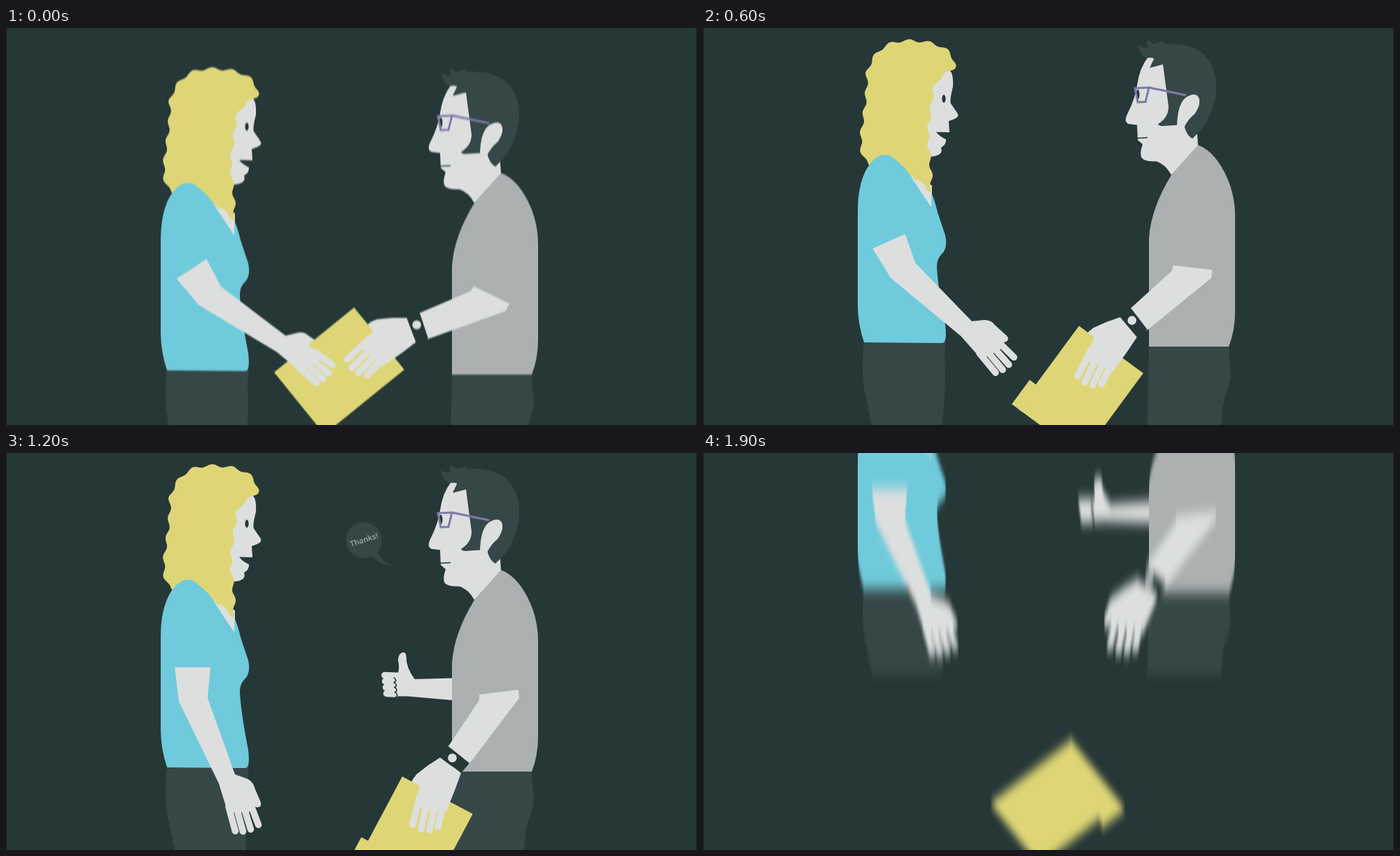
These frames come from a looping animation (987x567 px, 2 s). An HTML page:

```html
<!DOCTYPE html>
<html lang="en">
<head>
<meta charset="utf-8">
<title>Handing over a folder</title>
<style>
  html, body { margin: 0; width: 100%; height: 100%; overflow: hidden; background: #263737; }
  svg { display: block; width: 987px; height: 567px; }
  .skin { fill: #dddfdf; }
  .fingers { fill: none; stroke: #dddfdf; stroke-width: 9.5; stroke-linecap: round; }
  .dark { fill: #263737; }
  .darkLine { fill: none; stroke: #263737; stroke-width: 1.7; }
  .cloth { fill: #364748; }
  .yellow { fill: #ded676; }
  .bubbleText { font: 600 17px "Open Sans", "Noto Sans", sans-serif; fill: #a3abab; text-anchor: middle; }
</style>
</head>
<body>
<svg viewBox="0 0 987 567">
  <filter id="panBlur" filterUnits="userSpaceOnUse" x="0" y="-400" width="987" height="1600" color-interpolation-filters="sRGB">
    <feGaussianBlur id="panAmount" stdDeviation="0 0"/>
  </filter>
  <filter id="softBlur" filterUnits="userSpaceOnUse" x="400" y="150" width="400" height="400" color-interpolation-filters="sRGB">
    <feGaussianBlur stdDeviation="2.5"/>
  </filter>

  <rect width="987" height="567" fill="#263737"/>
  <path d="M.5 0V567M986.5 0V567" stroke="#142020"/>

  <g id="scene">
    <!-- speech bubble -->
    <g id="bubble">
      <circle class="cloth" cx="490" cy="105" r="39.5"/>
      <path class="cloth" d="M508 138Q522 161 551 160Q527 152 520 128Z"/>
      <text class="bubbleText" transform="translate(492 110) rotate(-18)">Thanks!</text>
    </g>

    <!-- raised thumb, behind the man -->
    <g id="thumbArm">
      <path class="skin" d="M700 322L637 324L583 328Q570 312 569.500 296Q569 290 564.500 290.500Q558 292 558 302Q561 312 559 320L549 321V354L575 353L700 358Z"/>
      <path id="fistFingers" class="fingers"/>
      <path id="knuckles" class="darkLine"/>
    </g>

    <!-- woman -->
    <path class="cloth" d="M230 448H347Q344 465 346 490Q346 530 341 572H242L231 520Q225 485 230 448Z"/>
    <path class="skin" d="M330 66L352 60Q358 65 357 84Q352 103 354 108L363 121Q367 127 359 130L351 133L352 149L333 148.500Q338 155 347 159Q348 166 340 171Q345 184 318 184L300 120Z"/>
    <ellipse class="dark" cx="344" cy="101" rx="2.600" ry="5.700"/>
    <path class="skin" d="M275 190L327 225V257L300 235Z"/>
    <path id="hair" class="yellow" d="M237 195C212 172 235 130 234 64C244 28 268 18 292 18C335 18 356 30 360 52C360 66 330 62 328 98L321 150C322 175 328 205 326 234L300 212"/>
    <path fill="#6fcadb" d="M221 265C221 227 229 204 242 190Q253 178 267 182Q292 200 300 217L326 256L326.500 236Q331 246 335 263L346 296Q350 314 341 323Q334 329 334 342Q336 374 346 424Q349 450 342 450L230 449Q221 422 221 395Z"/>

    <!-- man -->
    <path class="cloth" d="M637 453H752Q750 465 754 490Q754 506 747 522Q741 542 740 572H634.500Z"/>
    <path class="skin" d="M636 41Q623 58 620 82Q617 101 607 121Q600 134 608 137L620 138.500L621 160L628 166Q623 180 627 186Q632 191 648 190.500Q661 195 669 210L707 168L700 60Z"/>
    <path class="darkLine" d="M620 157.500L635 156.500"/>
    <ellipse class="dark" cx="621" cy="95" rx="2.500" ry="7"/>
    <path class="cloth" d="M632 43Q623 37 622 24Q628 29 635 28Q633 21 636 16Q640 22 645 23L657 18Q656 22 660 23Q690 20 711 34Q735 53 733 91Q730 121 711 146L699 158Q690 153 687 138L656 140Q651 140 650 137Q665 128 665 112Q660 75 657 52L638 57L645 42Z"/>
    <path class="skin" d="M677 139Q678 108 690 99Q703 91 708 99Q712 109 702 123Q693 130 687 142Z"/>
    <path fill="none" stroke="#7f7aa8" stroke-width="3" d="M617 86L637 85L632 105.500L621 106ZM637 85L690 96"/>
    <path fill="#acb0b1" d="M637 455V300Q640 257 669 210L707 167Q733 177 750 217Q760 242 760 268V405Q760 432 751 455Z"/>

    <!-- thumbs, folder, then the front hands -->
    <path data-arm="woman" class="skin" d="M318 456L344 465Q353 469 355 478L363.500 498Q366 505 360 506Q354 507 350 498L340 490Z"/>
    <path data-arm="man" class="skin" d="M606 444L586 460Q579 466 578 476Q572 489 573 500Q577 508 582 501L606 470Z"/>
    <g data-arm="man">
      <g id="folder" class="yellow">
        <rect width="114" height="147"/>
        <rect id="leftTab" x="-11" y="104" width="20" height="43"/>
        <rect id="rightTab" x="104" width="22" height="40"/>
      </g>
    </g>
    <g data-arm="woman">
      <path class="skin" d="M241 306H292L288 350L327 459L347 488L355 512L317 514L304 472L247 355Z"/>
      <path id="womanFingers" class="fingers"/>
    </g>
    <g data-arm="man">
      <path class="skin" d="M676 345L732 338L733 350L661 445L631 420L676 353Z"/>
      <path class="dark" d="M632 419L662 443L650 457L620 434Z"/>
      <circle class="skin" cx="637.500" cy="435.500" r="6.300"/>
      <path class="skin" d="M620 435L650 457L642 479L629 512L584 506L591 475L585 460L603 446Z"/>
      <path id="manFingers" class="fingers"/>
    </g>
  </g>
</svg>
<script>
const LOOP = 2000, STEP = 100;
const byId = id => document.getElementById(id);
const set = (el, name, value) => el.setAttribute(name, value);
const setFilter = (el, id) => set(el, "filter", id ? `url(#${id})` : "none");

// Smooth 0 to 1 between two times.
function ease(t, from, to) {
  const u = Math.min(1, Math.max(0, (t - from) / (to - from)));
  return u * u * (3 - 2 * u);
}

// Four fingers fanning out from a row of knuckles, the middle ones longest.
function fan(id, [x, y], [dx, dy], [tipX, tipY], [spreadX, spreadY], bow) {
  let d = "";
  for (let i = 0; i < 4; i++) {
    const reach = bow * Math.sin(i * Math.PI / 3);
    d += `M${x + dx * i} ${y + dy * i}L${tipX + spreadX * i} ${tipY + spreadY * i + reach}`;
  }
  set(byId(id), "d", d);
}

// Turns a plain outline into a curly one.
function curl(path, wavelength, depth, phase) {
  const points = [], length = path.getTotalLength();
  for (let s = 0; s <= length; s += 2) {
    const p = path.getPointAtLength(s), q = path.getPointAtLength(s + 1);
    const wave = depth * Math.cos((s - phase) * 2 * Math.PI / wavelength);
    points.push(`${p.x + (q.y - p.y) * wave} ${p.y - (q.x - p.x) * wave}`);
  }
  set(path, "d", `M${points.join("L")}Z`);
}

fan("womanFingers", [318, 505], [10.5, -1], [327.5, 540], [11, -3], 4);
fan("manFingers", [591, 490], [11.5, 2], [581, 531], [12, 1], 6);
fan("fistFingers", [557, 324.5], [0, 8.6], [540, 324.5], [1.3, 8.6], 0);
set(byId("knuckles"), "d", "M553 327" + "q6 4 1 7".repeat(4));
curl(byId("hair"), 28, 2, 218);

// The stage eases in from below and accelerates out at the top.
function panAt(t) {
  return t < LOOP / 2 ? 40 * Math.exp(-t / 60) : -255 * Math.exp((t - 1900) / 55.5);
}

// The raised thumb swings up and settles like a damped spring.
function thumbAngle(t) {
  const since = t - 800;
  return -66 * Math.exp(-since / 134) * Math.cos(since * Math.PI / 500);
}

// Corner and tilt of the folder, relative to the man's arm.
function folderAt(t, grip, pan) {
  const leaving = t - 1800;
  if (leaving >= 0) {
    return { x: 530 - 0.04 * leaving, y: 502 - 0.92 * leaving - pan, tilt: 49 + 0.03 * leaving };
  }
  const pull = Math.exp(-t / 130);
  return { x: 566 - 17 * pull, y: 462 - 2.5 * grip + 4 * pull, tilt: 28 - 13 * grip + 3 * pull };
}

function draw(t) {
  const pan = panAt(t), scene = byId("scene");
  const blur = pan > 0 ? pan / 44 : Math.pow(-pan, 0.6) / 3;
  set(scene, "transform", `translate(0 ${pan})`);
  set(byId("panAmount"), "stdDeviation", `0 ${blur}`);
  setFilter(scene, blur > 0.3 && "panBlur");

  const grip = 1 - ease(t, 350, 800), reach = 1 - ease(t, 450, 900);
  const pose = { woman: `rotate(${-33 * reach} 262.4 307.5)`, man: `rotate(${33 * grip} 699 324)` };
  document.querySelectorAll("[data-arm]").forEach(el => set(el, "transform", pose[el.dataset.arm]));

  const thumbArm = byId("thumbArm");
  set(thumbArm, "transform", `rotate(${thumbAngle(t)} 690 340)`);
  set(thumbArm, "opacity", t < 800 ? 0 : 1);
  setFilter(thumbArm, t < 1100 && "softBlur");

  const { x, y, tilt } = folderAt(t, grip, pan);
  set(byId("folder"), "transform", `translate(${x} ${y}) rotate(${tilt})`);
  set(byId("leftTab"), "opacity", grip < 0.6 && t < 1800 ? 1 : 0);
  set(byId("rightTab"), "opacity", t < 1800 ? 0 : 1);

  const bubble = byId("bubble");
  set(bubble, "transform", `translate(550 160) scale(${ease(t, 1050, 1300)}) translate(-550 -160)`);
  set(bubble, "opacity", Math.max(0, 1 + pan / 170));
}

const start = performance.now();
function frame() {
  const elapsed = (performance.now() - start) % LOOP;
  draw(Math.floor(elapsed / STEP) * STEP);
  requestAnimationFrame(frame);
}
frame();
</script>
</body>
</html>
```
